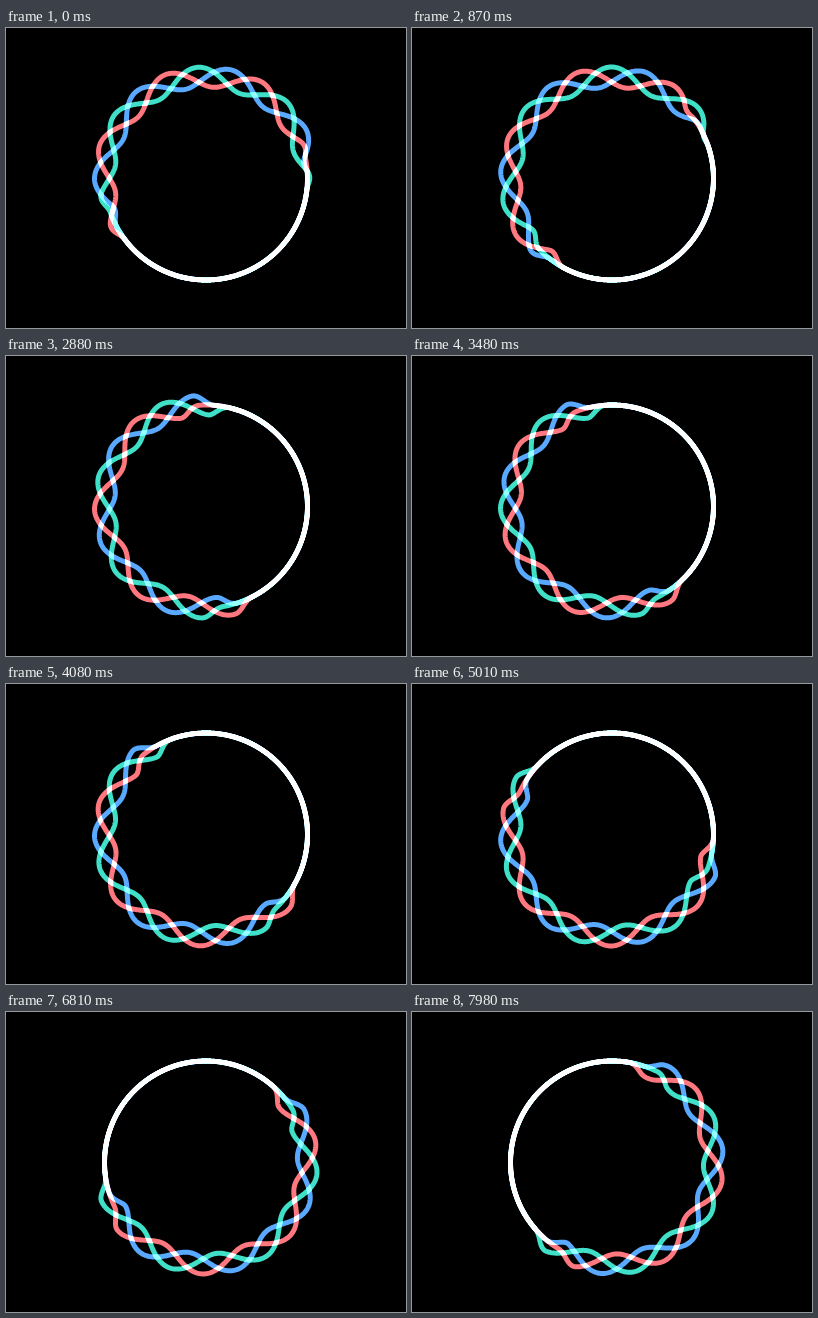
Recreate the animation shown at these times as an HTML page with a canvas. Size 400 by 300 pixels, loop 8000 ms.

```html
<!DOCTYPE html>
<html lang="en">
<head>
<meta charset="utf-8">
<title>Braided ring</title>
<style>
  html, body { margin: 0; width: 100%; height: 100%; overflow: hidden; background: #000; }
  canvas { display: block; }
</style>
</head>
<body>
<canvas id="stage" width="400" height="300"></canvas>
<script>
const ctx = document.getElementById('stage').getContext('2d');
const LOOP = 8000, STEP = 30;
const CX = 200, CY = 150.5, RADIUS = 101.5, AMPLITUDE = 10;
const WAVES = 7, WAVELENGTH = 360 / WAVES;
const WAVE_SPEED = 113.65, BRAID_SPEED = WAVE_SPEED / 4; // degrees per second
const BRAID_START = 2.5, BRAID_LENGTH = 205.5, RAMP = 13;
const FIRST_PEAK = 25.7;
// All strands share one motion; each runs ahead of the one before it.
const STRAND_LEAD = WAVELENGTH * 2 / 3 / WAVE_SPEED;
const STRANDS = [
  { color: '#40e0c8', lead: -STRAND_LEAD },
  { color: '#58a9ff', lead: 0 },
  { color: '#ff7880', lead: STRAND_LEAD },
];
const rad = degrees => degrees * Math.PI / 180;

function smoothstep(x) {
  x = Math.min(1, Math.max(0, x));
  return x * x * (3 - 2 * x);
}

// Strength of the wave at a distance in degrees from its start.
const envelope = d => smoothstep(d / RAMP) * smoothstep((BRAID_LENGTH - d) / RAMP);

function drawStrand(color, seconds) {
  const start = BRAID_START + BRAID_SPEED * seconds;
  const peak = FIRST_PEAK + WAVE_SPEED * seconds;
  ctx.beginPath();
  for (let d = 0; d < 360; d += 0.5) {
    const angle = start + d;
    const wave = Math.cos(rad(WAVES * (angle - peak)));
    const r = RADIUS + AMPLITUDE * envelope(d) * wave;
    ctx.lineTo(CX + r * Math.cos(rad(angle)), CY - r * Math.sin(rad(angle)));
  }
  ctx.closePath();
  ctx.strokeStyle = color;
  ctx.stroke();
}

function draw(now) {
  const seconds = Math.floor((now % LOOP) / STEP) * STEP / 1000;
  ctx.globalCompositeOperation = 'source-over';
  ctx.fillStyle = '#000';
  ctx.fillRect(0, 0, 400, 300);
  ctx.globalCompositeOperation = 'lighter';
  ctx.lineWidth = 5;
  ctx.lineJoin = 'round';
  for (const { color, lead } of STRANDS) drawStrand(color, seconds + lead);
}

const origin = performance.now();
function tick() {
  draw(performance.now() - origin);
  requestAnimationFrame(tick);
}
tick();
</script>
</body>
</html>
```
